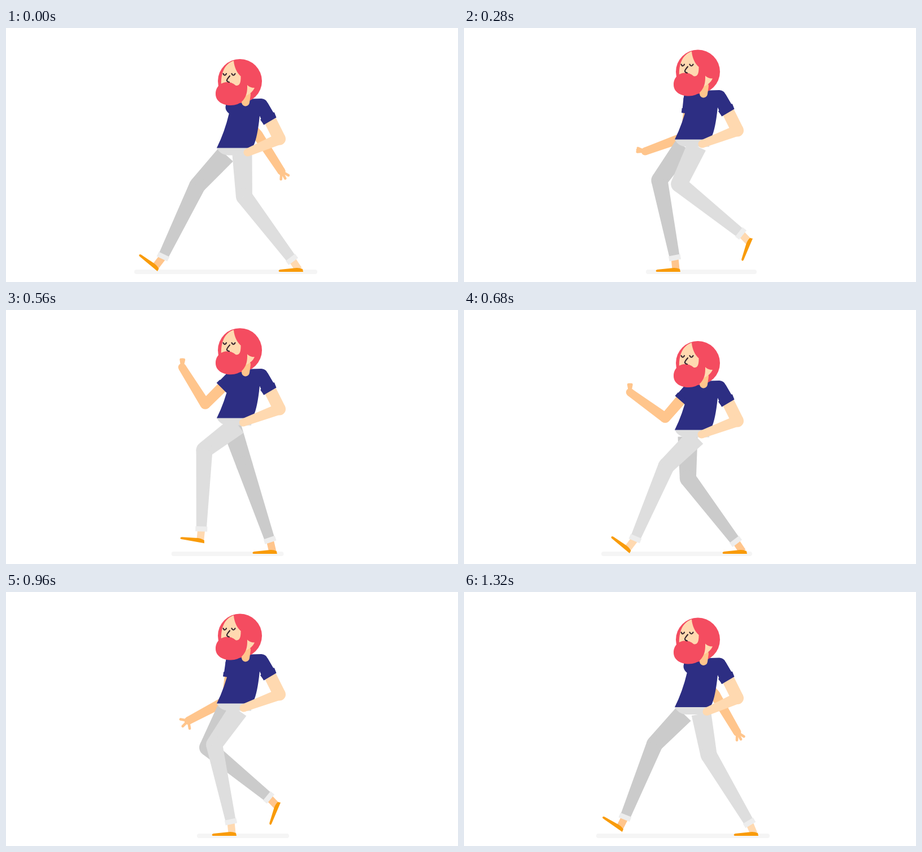
Write an HTML page that moves like this. It is 800 px wide and 450 px high and loops after 1360 ms.

```html
<!DOCTYPE html>
<html lang="en">
<head>
<meta charset="utf-8">
<title>Walk cycle</title>
<style>
html, body { margin: 0; width: 100%; height: 100%; overflow: hidden; background: #fff; }
svg { display: block; width: 100vw; height: 100vh; }
</style>
</head>
<body>
<svg id="stage" viewBox="0 0 800 450"></svg>
<script>
const LOOP = 1360, HALF = LOOP / 2, STEP = 40;
const THIGH = 74, SHIN = 140, UPPER = 67, FORE = 77;
const C = {
  far: '#cbcbcb', near: '#dedede', cuff: '#ededed', shirt: '#2d2e83', red: '#f44c60',
  shoe: '#f99b0a', skin: '#ffd9b0', skinFar: '#ffc58c', ink: '#35242e', ground: '#f5f5f5'
};

// Key rows: time, then one value per channel.
const LEG = [ // hip x, ankle x, y, heel x, y, foot angle
  [0, 389, 278, 405, 268, 431, 40],
  [120, 389, 308, 407, 318, 432, 0],
  [280, 389, 373, 407, 383, 432, 0],
  [440, 394, 438, 408, 454, 432, 0],
  [520, 398, 458, 407, 471, 432, 0],
  [640, 398, 480, 409, 496, 432, 0],
  [680, 396, 481, 410, 501, 432, 0],
  [800, 393, 484, 391, 500, 407, -37],
  [960, 390, 465, 364, 486, 373, -67],
  [1120, 388, 409, 369, 428, 383, -43],
  [1200, 388, 345, 382, 355, 406, -6],
  [1320, 389, 285, 399, 280, 425, 35]
];
const ARM = [ // upper angle, forearm angle, hand angle, finger spread
  [0, 47, 57, 62, 32],
  [280, 96, 160, 190, 14],
  [440, 129, 236, 270, 11],
  [560, 135, 238, 272, 11],
  [680, 131, 216, 270, 11],
  [960, 98, 152, 135, 55],
  [1200, 57, 76, 72, 20],
  [1320, 48.5, 59.5, 62, 30]
];
const BODY = [ // waist y, head shift
  [0, 212.5, 0], [160, 182, -1], [280, 197.5, -1.5], [360, 205, 0],
  [440, 200.5, 1], [520, 189, -2], [640, 204, -1]
];
const SHADOW = [ // left, right
  [0, 227, 551], [280, 322, 518], [440, 384, 489], [520, 318, 488], [680, 243, 510],
  [960, 338, 501], [1120, 378, 507], [1200, 293, 512], [1320, 234, 541]
];

// Periodic cubic through the keys, without overshoot.
function sample(rows, t, period) {
  const n = rows.length;
  t = ((t % period) + period) % period;
  let i = n - 1;
  while (rows[i][0] > t) i--;
  const at = k => rows[((k % n) + n) % n];
  const time = k => at(k)[0] + Math.floor(k / n) * period;
  const h = time(i + 1) - time(i), u = (t - time(i)) / h;
  return at(i).slice(1).map((_, c) => {
    const val = k => at(k)[c + 1];
    const grad = k => (val(k + 1) - val(k)) / (time(k + 1) - time(k));
    const tan = k => {
      const a = grad(k - 1), b = grad(k);
      return a * b <= 0 ? 0 : 2 * a * b / (a + b);
    };
    const v = 1 - u;
    return val(i) * (1 + 2 * u) * v * v + val(i + 1) * (3 - 2 * u) * u * u
      + h * u * v * (tan(i) * v - tan(i + 1) * u);
  });
}

const rad = d => d * Math.PI / 180;
const polar = (p, deg, r) => [p[0] + r * Math.cos(rad(deg)), p[1] + r * Math.sin(rad(deg))];
const pt = p => p[0].toFixed(2) + ' ' + p[1].toFixed(2);
const angle = (a, b) => Math.atan2(b[1] - a[1], b[0] - a[0]) * 180 / Math.PI;

const path = (d, fill) => `<path d="${d}" fill="${fill}"/>`;
const poly = (pts, fill) => path('M' + pts.map(pt).join('L') + 'Z', fill);
const dot = (p, r, fill) => `<circle cx="${p[0].toFixed(2)}" cy="${p[1].toFixed(2)}" r="${r}" fill="${fill}"/>`;
const line = (a, b, w, color, cap = 'butt') =>
  `<path d="M${pt(a)}L${pt(b)}" fill="none" stroke="${color}" stroke-width="${w}" stroke-linecap="${cap}"/>`;
const shift = (y, art) => `<g transform="translate(0 ${y.toFixed(2)})">${art}</g>`;

function taper(a, b, ra, rb, fill) {
  const g = angle(a, b);
  return poly([polar(a, g - 90, ra), polar(b, g - 90, rb), polar(b, g + 90, rb), polar(a, g + 90, ra)], fill);
}

function findKnee(hip, ankle) {
  const d = Math.hypot(ankle[0] - hip[0], ankle[1] - hip[1]);
  const g = angle(hip, ankle);
  if (d >= THIGH + SHIN) return polar(hip, g, d * THIGH / (THIGH + SHIN));
  const cos = (THIGH * THIGH + d * d - SHIN * SHIN) / (2 * THIGH * d);
  return polar(hip, g + Math.acos(Math.max(-1, Math.min(1, cos))) * 180 / Math.PI, THIGH);
}

function leg(t, waist, isNear) {
  const [hx, ax, ay, fx, fy, rot] = sample(LEG, isNear ? t - HALF : t, LOOP);
  const dx = isNear ? 25 : 0;
  const hip = [hx + (isNear ? 22 : 0), waist + 12];
  const ankle = [ax + dx, ay], heel = [fx + dx, fy];
  const knee = findKnee(hip, ankle), g = angle(knee, ankle);
  const cloth = isNear ? C.near : C.far, skin = isNear ? C.skin : C.skinFar;
  const sole = polar(polar(heel, rot + 180, 8), rot - 90, 4);
  const shoe = `<path transform="translate(${pt(heel)}) rotate(${rot.toFixed(2)})" fill="${C.shoe}"
    d="M0 0L-1 -5Q-8 -8 -17 -6.5L-41 -4Q-43.500 -3.500 -43.500 -1.500Q-43 0 -41 0Z"/>`;
  return line(ankle, sole, 13, skin) + shoe
    + taper(hip, knee, 17.5, 14.5, cloth) + dot(knee, 14.5, cloth)
    + taper(knee, ankle, 14.5, 9, cloth)
    + line(polar(ankle, g, -4.5), polar(ankle, g, 4.5), 21, C.cuff);
}

function farArm(t, waist) {
  const [up, fore, hand, spread] = sample(ARM, t, LOOP);
  const shoulder = [400, waist - 72];
  const elbow = polar(shoulder, up, UPPER), wrist = polar(elbow, fore, FORE);
  const fingers = [-1, 0, 1].map(k => line(wrist, polar(wrist, hand + k * spread, 14), 4.6, C.skinFar, 'round'));
  const end = polar(shoulder, up, 26);
  return taper(shoulder, elbow, 10, 9, C.skinFar) + dot(elbow, 9, C.skinFar)
    + taper(elbow, wrist, 9, 7, C.skinFar) + dot(wrist, 7, C.skinFar) + fingers.join('')
    + dot(shoulder, 11.5, C.shirt) + taper(shoulder, end, 11.5, 11.5, C.shirt)
    + line(polar(end, up, -8), end, 25, C.shirt);
}

function nearArm(hipX) {
  const elbow = [484, -16], hand = [hipX + 9.5, 8];
  return taper([467, -50], elbow, 11, 11, C.skin) + dot(elbow, 11, C.skin)
    + taper(elbow, hand, 10, 7, C.skin) + dot(hand, 7, C.skin);
}

// Torso parts are drawn with the waist at y = 0.
const pelvis = path('M373 -1H436L434 13H393Q379 12 373 0Z', C.near);
const shirt = path('M389 -73Q389 -85 400 -86L452 -87.500Q460 -87 463 -80L478 -54L456 -41L449 -57'
  + 'Q445 -18 438 -4Q436 -1 428 0H373Q387 -28 395 -62Q389 -67 389 -73Z', C.shirt);
const sleeve = path('M448 -72L463 -80L473 -63L475 -63L478.500 -54L456.500 -41L450 -50L452 -52L448 -60Z', C.shirt);
const neck = line([426, -95], [424, -81], 14, C.skinFar, 'round');

// Head is drawn at its lowest pose.
const ink = d => `<path d="${d}" fill="none" stroke="${C.ink}" stroke-width="2.2" stroke-linecap="round"/>`;
const hair = dot([414, 94], 39, C.red);
const face = path('M403 58C387 63 380 80 381 101L411 107C416 101 416 92 416 86C409 80 404 70 403 58Z', C.skin)
  + path('M426 100Q431 106 440 106Q436 115 425 120Z', C.skin)
  + path('M371 117C371 104 380 96 392 96C399 96 403 99 407 102C413 103 416 97 415.500 86L427 86V105'
    + 'C427 126 415 137 398 137C382 137 371 129 371 117Z', C.red)
  + ink('M384.500 81Q387 86.500 390 81') + ink('M399.500 81Q402.500 86.500 405.500 81')
  + ink('M396 85Q390 92 391 93.500Q392 95.500 395 96');

const stage = document.getElementById('stage');

function draw(t) {
  const [waist, nod] = sample(BODY, t, HALF);
  const [left, right] = sample(SHADOW, t, LOOP);
  const nearHip = sample(LEG, t - HALF, LOOP)[0] + 22;
  const headY = waist - 212.5 + nod;
  stage.innerHTML = line([left + 4, 432], [right - 4, 432], 8, C.ground, 'round')
    + farArm(t, waist) + leg(t, waist, false) + shift(waist, pelvis) + leg(t, waist, true)
    + shift(waist, shirt + nearArm(nearHip) + sleeve)
    + shift(headY, hair) + shift(waist, neck) + shift(headY, face);
}

let start = null, last = -1;
function tick(now) {
  if (start === null) start = now;
  const t = Math.floor(((now - start) % LOOP) / STEP) * STEP;
  if (t !== last) draw(last = t);
  requestAnimationFrame(tick);
}
draw(0);
requestAnimationFrame(tick);
</script>
</body>
</html>
```
